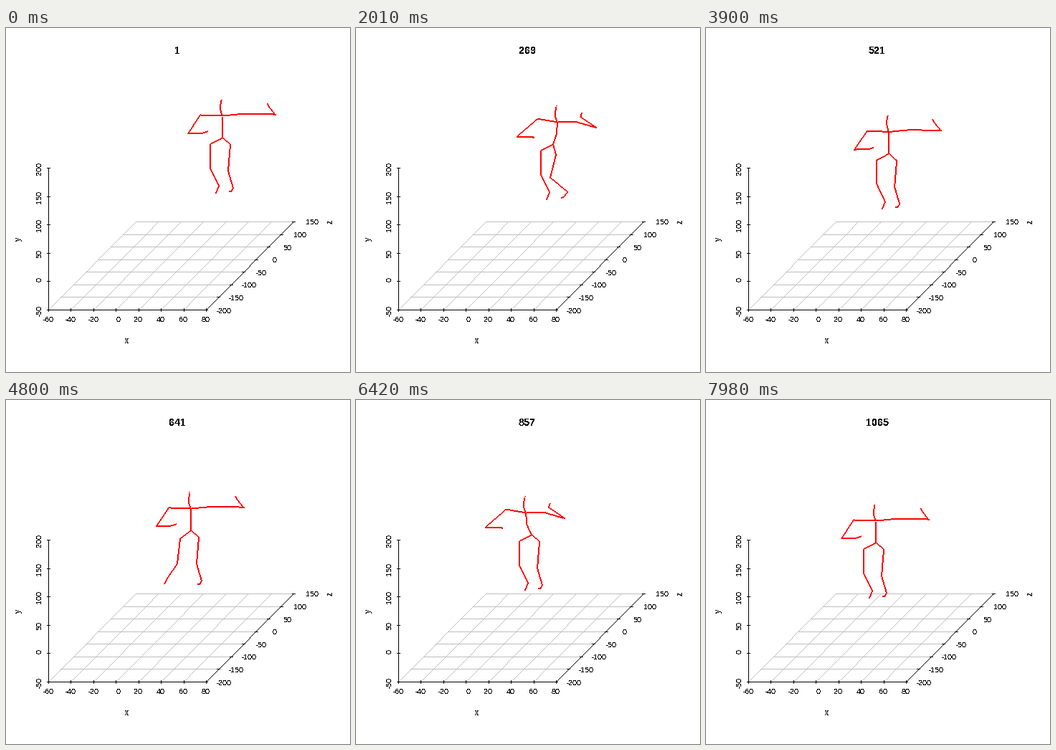
A matplotlib script for the animation above (8000 ms loop, 480 by 480 pixels).

```python
import numpy as np
import matplotlib.pyplot as plt
from matplotlib.animation import FuncAnimation
from matplotlib.patches import PathPatch
from matplotlib.path import Path

plt.rcParams.update({
    "font.family": "Liberation Sans",
    "text.hinting": "native",
    "text.hinting_factor": 1,
    "text.antialiased": False,
})

SIZE, DPI = 480, 72
STEP, FRAMES = 20, 400      # ms per drawn frame, frames per loop
POSE_S = 0.03               # seconds between two poses of the walker

# Walk of the pelvis: seconds, x, y
WALK = np.array([
    (0, 302, 153), (0.75, 287, 154), (1.5, 288, 158), (2.01, 275, 162),
    (3, 275, 170), (3.7, 257, 174), (4.8, 258, 182), (6.42, 245, 188),
    (7.98, 237, 199),
], float)

HEAD = [(-1.5, -23), (-3, -14.5), (-2.5, -7.5)]     # seen from the chest

# Each limb has a rest pose and a moved pose, seen from its root joint
LEFT_ARM = ([(-31, -1), (-48, 25), (-27, 24), (-21, 22)],
            [(-28, -5), (-57, 20), (-33, 21), (-34, 19)])
RIGHT_ARM = ([(31, -3), (74, -2), (65, -14), (63, -18)],
             [(27, 0), (53, 8), (31, -7), (33, -13)])
LEFT_LEG = ([(-17, 9), (-17, 42), (-5, 67), (-9, 77)],
            [(-15, 11), (-19, 46), (-32, 65), (-37, 74)])
RIGHT_LEG = ([(11, 10), (8, 46), (15, 70), (12, 75), (9, 75)],
             [(4, 14), (-4, 47), (20, 67), (14, 74), (11, 75)])


def along_path(t, keys):
    """Cubic Hermite curve through rows of (time, x, y)."""
    times, points = keys[:, 0], keys[:, 1:]
    slope = np.gradient(points, times, axis=0)
    k = int(np.clip(np.searchsorted(times, t, "right") - 1, 0, len(times) - 2))
    h = times[k + 1] - times[k]
    u = (t - times[k]) / h
    ease = u * u * (3 - 2 * u)
    return (points[k] * (1 - ease) + points[k + 1] * ease
            + h * u * (1 - u) * (slope[k] * (1 - u) - slope[k + 1] * u))


def pulse(t, centre, width):
    return np.exp(-((t - centre) / width) ** 2)


def limb(root, poses, weight):
    rest, moved = np.array(poses, float)
    return np.vstack([root, root + rest + weight * (moved - rest)])


def walker(t):
    turn = pulse(t, 2.2, 1) + pulse(t, 6.3, 0.75)
    cross = pulse(t, 2.01, 0.7)
    stride = pulse(t, 4.8, 0.4)
    lean = 6 * cross - 8 * pulse(t, 6.42, 0.6)

    pelvis = along_path(t, WALK)
    waist = pelvis + (0.8 * lean, -14)
    chest = pelvis + (lean, -30.5)
    return [
        np.vstack([chest + HEAD, chest, waist, pelvis]),
        limb(chest, LEFT_ARM, turn),
        limb(chest, RIGHT_ARM, turn),
        limb(pelvis, LEFT_LEG, stride),
        limb(pelvis, RIGHT_LEG, cross),
    ]


def cells(p, q, width):
    """Boxes for the pixels of a hard-edged line from p to q."""
    p, q = np.asarray(p, float), np.asarray(q, float)
    span = np.abs(q - p)
    points = np.round(np.linspace(p, q, max(1, int(round(span.max()))) + 1))
    across = np.array([1, 0]) if span[1] > span[0] else np.array([0, 1])
    x0, y0 = (points - 0.45 - (width - 1) * across).T
    x1, y1 = (points + 0.45).T
    return np.stack([np.c_[x0, y0], np.c_[x1, y0],
                     np.c_[x1, y1], np.c_[x0, y1]], axis=1)


def pixel_path(lines, width=1):
    return Path.make_compound_path_from_polys(np.concatenate(
        [cells(p, q, width) for line in lines for p, q in zip(line, line[1:])]))


fig = plt.figure(figsize=(SIZE / DPI, SIZE / DPI), dpi=DPI, facecolor="white")
ax = fig.add_axes([0, 0, 1, 1])
ax.set_xlim(-0.5, SIZE - 0.5)
ax.set_ylim(SIZE - 0.5, -0.5)
ax.axis("off")


def stroke(lines, color, width=1):
    return ax.add_patch(PathPatch(pixel_path(lines, width), facecolor=color,
                                  linewidth=0, antialiased=False))


def label(x, y, text, size=10, turn=0, **kw):
    return ax.text(x, y, text, fontsize=size, rotation=turn, ha="center",
                   va="baseline", rotation_mode="anchor", **kw)


# Corners of the box: origin, right end of x, depth of z, top of y
X0, Y0, X1 = 59, 393, 279
DX, DZ, TOP = 122, -123, 195

xs = np.linspace(X0, X1, 8)
ys = np.linspace(Y0, TOP, 6)
depth = np.linspace((0, 0), (DX, DZ), 8)

stroke([[(x, Y0), (x + DX, Y0 + DZ)] for x in xs]
       + [[(X0 + dx, Y0 + dy), (X1 + dx, Y0 + dy)] for dx, dy in depth], "#bebebe")

stroke([[(X0, TOP), (X0, Y0), (X1, Y0), (X1 + DX, Y0 + DZ)]]
       + [[(x, Y0 - 2), (x, Y0 + 2)] for x in xs]
       + [[(X0 - 2, y), (X0 + 2, y)] for y in ys]
       + [[(X1 + dx - 2, Y0 + dy), (X1 + dx + 2, Y0 + dy)] for dx, dy in depth],
       "black")


def nudge(v):
    """A lone zero sits a little further along its axis."""
    return 2.5 if v == 0 else -0.5


for x, v in zip(xs, range(-60, 81, 20)):
    label(x + nudge(v), 410, str(v))
for y, v in zip(ys, range(-50, 201, 50)):
    label(49, y - nudge(v), str(v), turn=90)
for (dx, dy), v in zip(depth, range(-200, 151, 50)):
    label(X1 + dx + 25 + 0.7 * np.sign(v), Y0 + dy + 4, str(v))

label(168, 440, "x", 12)
label(20, 294, "y", 12, 90)
label(455, 270, "z", 12, 90)

title = label(238.5, 36, "1", 14.4, weight="bold")
body = stroke(walker(0), "red", 2)


def draw(k):
    pose = (2 * k + 1) // 3
    title.set_text(str(1 + 4 * pose))
    body.set_path(pixel_path(walker(pose * POSE_S), 2))
    return title, body


anim = FuncAnimation(fig, draw, frames=FRAMES, interval=STEP,
                     repeat=True, repeat_delay=0, blit=False)
plt.show()
```
